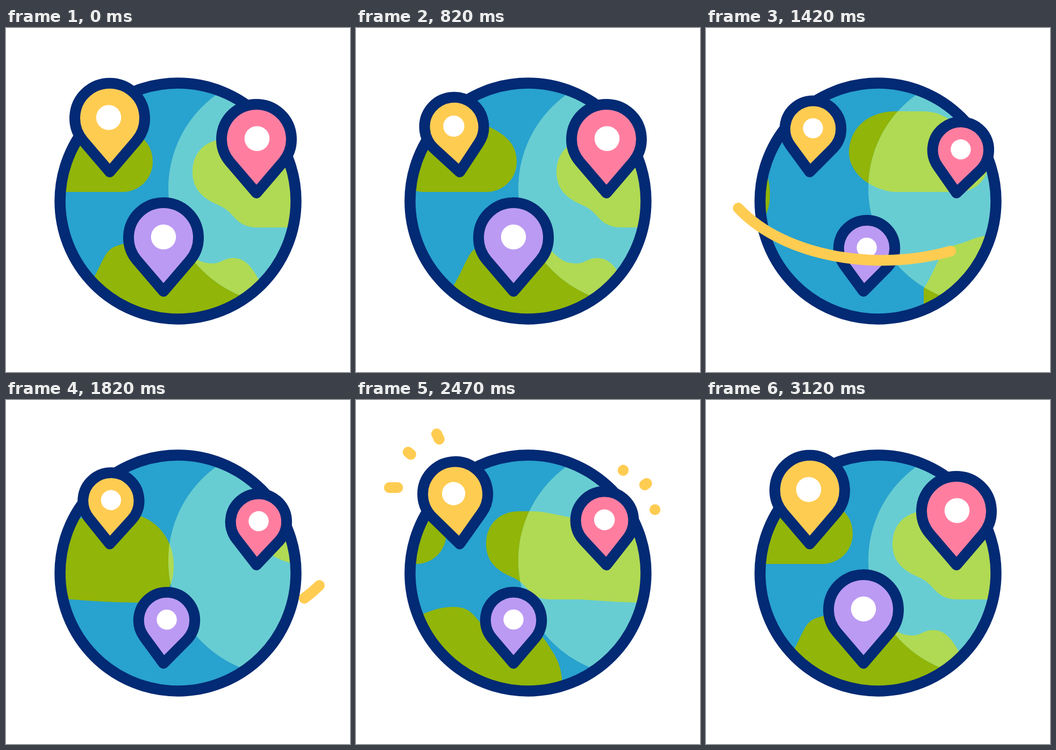
These frames come from a looping animation (640x640 px, 3170 ms). An HTML page:

```html
<!DOCTYPE html>
<html lang="en">
<head>
<meta charset="utf-8">
<title>Globe with pins</title>
<style>
  html, body { margin: 0; width: 100%; height: 100%; overflow: hidden; background: #fff; }
  svg { display: block; width: 100%; height: 100%; }
  .line { fill: none; stroke: #ffcc52; stroke-width: 20; stroke-linecap: round; }
  .pin path { stroke: #032a74; stroke-width: 20; stroke-linejoin: round; vector-effect: non-scaling-stroke; }
  .pin circle { fill: #fff; }
</style>
</head>
<body>
<svg viewBox="0 0 640 640">
  <defs>
    <clipPath id="globe"><circle cx="320" cy="322" r="214"/></clipPath>
    <clipPath id="lit"><circle cx="517" cy="298.5" r="215"/></clipPath>
    <g id="lands">
      <path d="M97 305C50 300 13 268 13 232C13 190 45 155 100 155H150C185 155 200 172 222 184C255 200 273 218 273 249C273 280 248 305 217 305Z"/>
      <path d="M408 207H432C465 207 500 221 526 221C560 221 580 211 620 211C675 211 713 255 713 308C713 350 695 377 651 377C610 377 560 374 523 371H468C440 371 430 358 418 345C403 329 388 329 371 316C352 302 347 284 347 267C347 232 372 207 408 207Z"/>
      <path d="M152 485C165 465 175 440 182 428C192 408 203 406 217 402C240 396 250 386 285 385C320 384 325 405 341 418C355 432 365 438 385 438C400 438 405 428 423 428C450 428 462 455 470 467C485 490 489 510 489 540H152Z"/>
    </g>
    <g id="world"><use href="#lands"/><use href="#lands" x="-847"/></g>
  </defs>

  <g clip-path="url(#globe)">
    <rect width="640" height="640" fill="#28a2ce"/>
    <use class="map" href="#world" fill="#91b508"/>
    <g clip-path="url(#lit)">
      <rect width="640" height="640" fill="#68cdd2"/>
      <use class="map" href="#world" fill="#b0da53"/>
    </g>
  </g>
  <circle cx="320" cy="322" r="219.5" fill="none" stroke="#032a74" stroke-width="20.5"/>
  <g id="rays"></g>
  <g id="pins"></g>
  <path id="orbit" class="line" pathLength="1" d="M60 335C180 463 465 463 583 345"/>
</svg>
<script>
const LOOP = 3170, HOLD = 620, STEP = 50;

const make = (tag, parent, attrs) => {
  const el = document.createElementNS('http://www.w3.org/2000/svg', tag);
  for (const k in attrs) el.setAttribute(k, attrs[k]);
  return parent.appendChild(el);
};

// Smooth monotone curve through [time, value] keys, flat at both ends
function track(...keys) {
  const slope = i => (keys[i + 1][1] - keys[i][1]) / (keys[i + 1][0] - keys[i][0]);
  const tangent = i => {
    if (i === 0 || i === keys.length - 1) return 0;
    const a = slope(i - 1), b = slope(i);
    return a * b > 0 ? 2 * a * b / (a + b) : 0;
  };
  return t => {
    if (t <= keys[0][0]) return keys[0][1];
    const i = keys.findIndex(k => k[0] > t) - 1;
    if (i < 0) return keys[keys.length - 1][1];
    const [t0, v0] = keys[i], [t1, v1] = keys[i + 1];
    const d = t1 - t0, u = (t - t0) / d, w = 1 - u;
    return v0 * w * w * (1 + 2 * u) + v1 * u * u * (3 - 2 * u)
      + d * u * w * (tangent(i) * w - tangent(i + 1) * u);
  };
}

const ramp = (t, start, length) => {
  const u = Math.min(1, Math.max(0, (t - start) / length));
  return u * u * (3 - 2 * u);
};

function trim(el, tail, head) {
  el.style.visibility = head > 0 && tail < 1 ? 'visible' : 'hidden';
  el.setAttribute('stroke-dasharray', `${Math.max(head - tail, 0.0001)} 3`);
  el.setAttribute('stroke-dashoffset', -tail);
}

const spin = track([570, 0], [820, 26], [1420, 253], [1820, 446], [2220, 639], [2720, 813], [3080, 847]);

// Pin motion, timed from the start of each pin's shrinking and growing
const shrink = track([0, 1], [200, .846], [300, .803]);
const sway = track([0, 0], [200, -7.1], [400, 4.3], [550, 5.7], [800, 4.3], [1000, 2.8], [1200, 1.7], [1400, .1], [1500, 0]);
const grow = track([0, 0], [140, .074], [300, .197]);
const swing = track([0, 0], [140, -5.3], [180, -5.6], [320, 3.6], [400, 6], [450, 5.5], [540, 0]);
const dotLag = track([0, 0], [140, -1], [320, -3], [450, -6], [540, 0]);

const pins = [
  { x: 193, y: 267.8, fill: '#ffcc52', dot: -2, down: 620, up: 2270, burst: 2180,
    rays: ['M161 86L150 63', 'M124 120L97 97', 'M98 163L62 163'] },
  { x: 466, y: 307, fill: '#ff7ea0', dot: 1, down: 820, up: 2400, burst: 2415,
    rays: ['M497 131L507.5 105', 'M537 158L561 141', 'M556 204L587 204'] },
  { x: 293, y: 490, fill: '#bb9af3', dot: 0, down: 1020, up: 2580, burst: 2720,
    rays: ['M243 578L228 606', 'M293 598L293 621', 'M343 578L358 606'] }
];

const $ = id => document.getElementById(id);
for (const p of pins) {
  p.group = make('g', $('pins'), { class: 'pin' });
  p.body = make('path', p.group, { fill: p.fill, d: 'M0 0L-49.4 -57.8A65 65 0 1 1 49.4 -57.8Z' });
  p.eye = make('circle', p.group, {});
  p.lines = p.rays.map(d => make('path', $('rays'), { class: 'line', pathLength: 1, d }));
}
const maps = document.querySelectorAll('.map');

function drawPin(p, t) {
  const scale = shrink(t - p.down) + grow(t - p.up);
  const tilt = sway(t - p.down) + swing(t - p.up);
  p.group.setAttribute('transform', `translate(${p.x} ${p.y}) rotate(${tilt})`);
  p.body.setAttribute('transform', `scale(${scale})`);
  p.eye.setAttribute('cx', p.dot * (scale - .8) * 5 + dotLag(t - p.up));
  p.eye.setAttribute('cy', -100 * scale - 1.3);
  p.eye.setAttribute('r', 23.3 * scale);
  p.lines.forEach((line, i) => {
    const start = p.burst + (i === 1 ? 0 : 40);
    trim(line, ramp(t, start + 130, 220), ramp(t, start, 220));
  });
}

function draw(t) {
  maps.forEach(m => m.setAttribute('transform', `translate(${spin(t)} 0)`));
  pins.forEach(p => drawPin(p, t));
  trim($('orbit'), ramp(t, 1440, 450), ramp(t, 1120, 450));
}

const origin = performance.now();
function tick() {
  const t = (performance.now() - origin) % LOOP;
  draw(t < HOLD ? 0 : HOLD + Math.floor((t - HOLD) / STEP) * STEP);
  requestAnimationFrame(tick);
}
tick();
</script>
</body>
</html>
```
